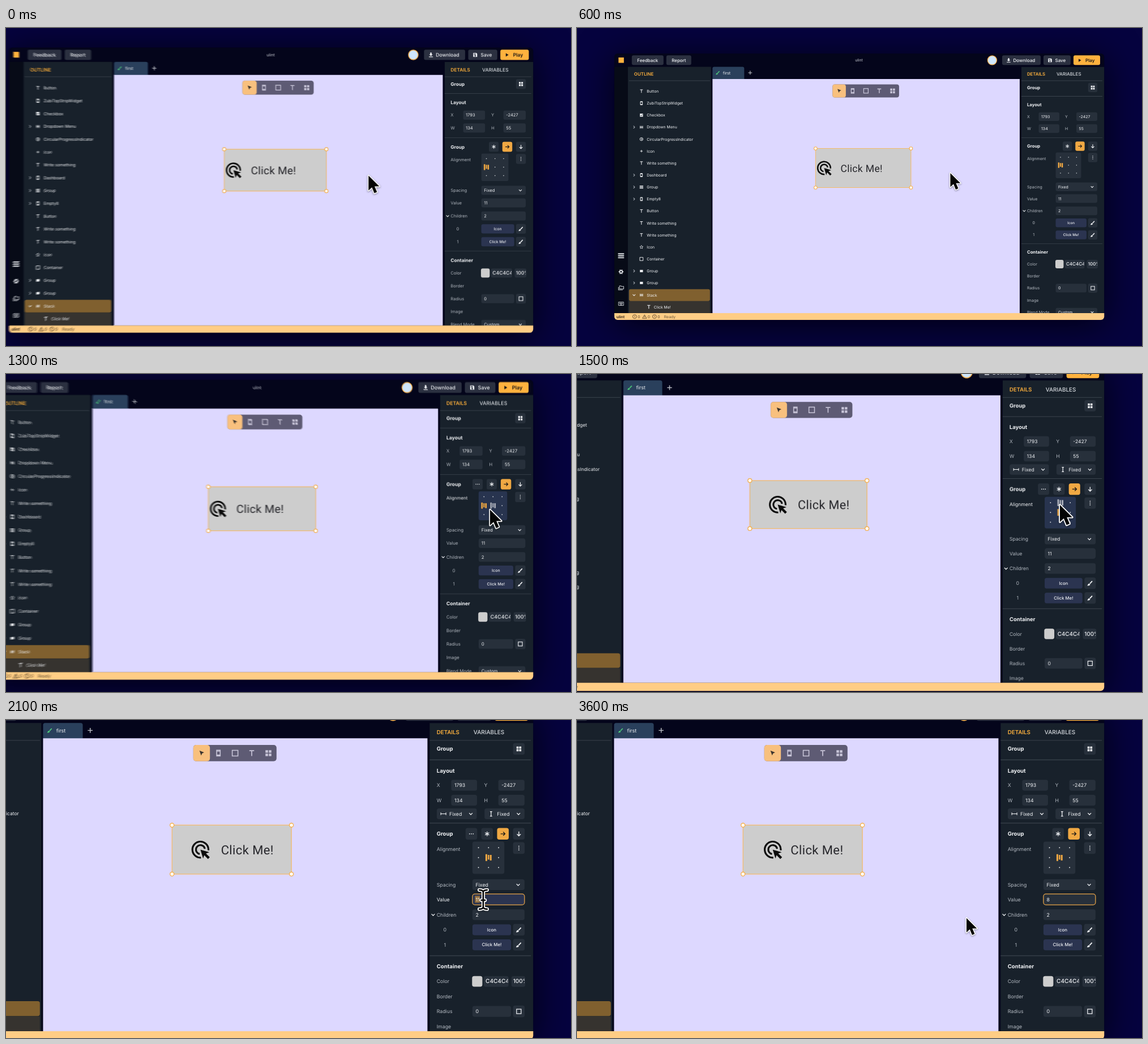
These frames come from a looping animation (998 by 561 pixels, 3.7 s). An HTML page with a canvas:

```html
<!DOCTYPE html>
<html lang="en">
<head>
<meta charset="utf-8">
<title>Editor zoom</title>
<style>
html, body { margin: 0; width: 100%; height: 100%; overflow: hidden; background: #06033f; }
canvas { display: block; width: 998px; height: 561px; }
</style>
</head>
<body>
<canvas id="stage"></canvas>
<script>
const W = 998, H = 561, LOOP = 3700, STEP = 100;
const dpr = window.devicePixelRatio || 1;
const makeCanvas = c => { c.width = W * dpr; c.height = H * dpr; return c; };
const stage = makeCanvas(document.getElementById('stage'));
const layer = makeCanvas(document.createElement('canvas'));
const out = stage.getContext('2d');
const g = layer.getContext('2d');

const ORANGE = '#ffb23e', PANEL = '#18212b', FIELD = '#27303b', CHIP = '#2b3450';
const WHITE = '#f2f4f7', GREY = '#b4bac2', LINE = '#3a434d', DARK = '#1d1a18';

// name: [path around 0,0, line width (0 = filled)]
const ICONS = {
  text: ['M-2.7-2.8H2.7M0-2.8V3.2', 1.1],
  phone: ['M-2-3.3H2V3.3H-2ZM-2-2.2H2M-2 2.2H2', 1],
  solid: ['M-3-3H3V3H-3Z', 0],
  tick: ['M-1.7 0L-.4 1.3 1.9-1.3', .9],
  menu: ['M-3-2.3H3M-3 0H3M-3 2.3H3', 1.4],
  cols: ['M-2.4-2.6V2.8M0-2.6V2.8M2.4-2.6V2.8M-3 .1H3', 1],
  ring: ['M3 0A3 3 0 1 1-3 0A3 3 0 1 1 3 0M0-1.6V1.6M1-1V1', 1],
  plus: ['M-2.4 0H2.4M0-2.4V2.4', 1],
  bigPlus: ['M-3.4 0H3.4M0-3.4V3.4', 1.1],
  card: ['M-3-2.2H3V2.2H-3Z', 0],
  star: ['M0-3.2L1-1 3.2-.8 1.5.7 2 3 0 1.8-2 3-1.5.7-3.2-.8-1-1Z', .8],
  square: ['M-3.2-3.2H3.2V3.2H-3.2Z', 1],
  right: ['M-1.1-2.2L1.1 0-1.1 2.2', 1],
  down: ['M-2.3-1.1L0 1.2 2.3-1.1', 1],
  gear: ['M2.4 0A2.4 2.4 0 1 1-2.4 0A2.4 2.4 0 1 1 2.4 0M-4.2 0H-3M3 0H4.2M-2.1-3.6L-1.5-2.6M2.1 3.6L1.5 2.6M2.1-3.6L1.5-2.6M-2.1 3.6L-1.5 2.6', 1.9],
  folder: ['M-2.7-3.2H0L1-2.2H4.6V2H-2.7ZM-4.5-1.2V3.8H3', 1],
  keys: ['M-4.5-3H4.5V3H-4.5ZM-3-1.2H3M-3 .3H3M-1.6 1.8H1.6', .9],
  widgets: ['M-3.3-3.3H-.4V-.4H-3.3ZM.5-3.3H3.4V-.4H.5ZM-3.3.5H-.4V3.4H-3.3ZM.5.5H3.4V3.4H.5Z', 0],
  goRight: ['M-3.2 0H3M.4-2.6L3 0 .4 2.6', 1.1],
  goDown: ['M0-3.2V3M-2.6.4L0 3 2.6.4', 1.1],
  burst: ['M0-3.3V3.3M-2.9-1.65L2.9 1.65M-2.9 1.65L2.9-1.65', 1],
  brush: ['M3-3L-.4.6M-1 1Q-2.2 1-2.9 2.8-1 2.8-.4 1.4', 1.5],
  dots: ['M-2.6 0h.01M0 0h.01M2.6 0h.01', 1.4],
  kebab: ['M0-2.6v.01M0 0v.01M0 2.6v.01', 1.4],
  download: ['M-1.2-3.6H1.2V-.6H3L0 2.1-3-.6H-1.2ZM-3.3 2.9H3.3V4H-3.3Z', 0],
  save: ['M-3.2-3.2H2L3.3-2V3.3H-3.2ZM-2-2V-.6H1V-2ZM1.3 1.5A1.3 1.3 0 1 0-1.3 1.5A1.3 1.3 0 1 0 1.3 1.5', 0],
  play: ['M-2-2.8L2.6 0-2 2.8Z', 0],
  pointer: ['M-2.5-2.9L3-.8.6.4-.5 2.8Z', 0],
  fixW: ['M-3.4 0H3.4M-3.6-1.8V1.8M3.6-1.8V1.8', .9],
  fixH: ['M-1.5-3.2H1.5M0-3.2V3.2M-1.5 3.2H1.5', 1],
  alert: ['M3.4 0A3.4 3.4 0 1 1-3.4 0A3.4 3.4 0 1 1 3.4 0M0-1.8V.5M0 1.4V2', .9],
  warn: ['M0-3.2L3.7 3.1H-3.7ZM0-1V1M0 1.6V2.2', .9],
  bars: ['M-4.3-4.8H-1.9V4.8H-4.3ZM-1-3.8H1V2.8H-1ZM1.9-3.8H4.3V4H1.9Z', 0],
};
for (const k in ICONS) ICONS[k][0] = new Path2D(ICONS[k][0]);

function icon(name, x, y, color = WHITE, size = 1) {
  const [path, width] = ICONS[name];
  g.save();
  g.translate(x, y);
  g.scale(size, size);
  g.lineCap = width === 1.4 ? 'round' : 'butt';
  g.lineWidth = width;
  g.fillStyle = g.strokeStyle = color;
  if (width) g.stroke(path); else g.fill(path, 'evenodd');
  g.restore();
}

function box(x, y, w, h, r, fill, stroke) {
  g.beginPath();
  g.roundRect(x, y, w, h, r);
  if (fill) { g.fillStyle = fill; g.fill(); }
  if (stroke) { g.strokeStyle = stroke; g.lineWidth = 1; g.stroke(); }
}

function disc(x, y, r, fill, stroke, width) {
  g.beginPath();
  g.arc(x, y, r, 0, 7);
  g.fillStyle = fill;
  g.fill();
  if (stroke) { g.strokeStyle = stroke; g.lineWidth = width; g.stroke(); }
}

// y is the middle of the capitals
function text(s, x, y, size = 6.8, color = WHITE, weight = 400, align = 'left') {
  g.font = `${weight} ${size}px Inter, sans-serif`;
  g.textAlign = align;
  g.fillStyle = color;
  g.fillText(s, x, y + size * .36);
}

const rule = y => box(785, y - .4, 143, .9, 0, LINE);
const tool = (name, x, y, fill = FIELD, color = WHITE) => {
  box(x - 8.2, y - 8.2, 16.4, 16.4, 3, fill);
  icon(name, x, y, color);
};
const field = (s, x, y, w) => { box(x, y - 7.6, w, 15.2, 3, FIELD); text(s, x + 4.5, y, 7); };
const label = (s, y, lit) => text(s, 795, y, 7, lit ? WHITE : GREY);

const mix = (a, b, p) => a + (b - a) * p;
const ease = (t, from, to) => {
  const p = Math.min(1, Math.max(0, (t - from) / (to - from)));
  return p * p * (3 - 2 * p);
};

function camera(t) {
  if (t < 700) return { scale: 1 + .0705 * Math.exp(-t / 104.5), cy: 193 };
  const u = Math.max(0, t - 1190) / 150;
  return { scale: 1 + .2516 * (1 - Math.exp(-(u ** 1.184))), cy: 320 };
}

function cursorAt(t) {
  const reach = ease(t, 620, 1230), drift = ease(t, 1250, 1500);
  const drop = ease(t, 1600, 2060), leave = ease(t, 3220, 3620);
  let x = mix(658.5, 862, reach), y = mix(254.5, 247, reach);
  x = mix(mix(x, 866.5, drift), 860.7, drop);
  y = mix(mix(y, 246, drift), 317.4, drop);
  x = mix(x, 735.2, leave);
  y = mix(y, 342.2, leave) + 12 * Math.sin(Math.PI * leave);
  return { x, y, size: mix(1, .82, leave) };
}

function stateAt(t) {
  const cursor = cursorAt(t), centred = t >= 1400, shift = centred ? 16.3 : 0;
  const y = cursor.y - shift, inPanel = cursor.x > 785;
  return {
    cursor, centred, shift,
    inGroup: inPanel && y > 193 && y < 380,
    onGrid: inPanel && y > 219 && y < 266,
    onValue: inPanel && y > 292 && y < 310,
    focused: t >= 2000,
    value: t >= 2700 ? 8 : 11,
  };
}

const ROWS = [
  ['text', 'Button'], ['phone', 'ZubiTopStripWidget'], ['solid', 'Checkbox'],
  ['cols', 'Dropdown Menu', 1], ['ring', 'CircularProgressIndicator'], ['plus', 'Icon'],
  ['text', 'Write something'], ['phone', 'Dashboard', 1], ['menu', 'Group', 1],
  ['phone', 'Empty8', 1], ['text', 'Button'], ['text', 'Write something'],
  ['text', 'Write something'], ['star', 'Icon'], ['square', 'Container'],
  ['card', 'Group', 1], ['card', 'Group', 1],
];

function drawHeader() {
  box(73.5, 52, 9.5, 9.5, 0, ORANGE);
  box(97, 48.4, 56, 17, 3, '#2b3040');
  text('Feedback', 125, 57, 7.9, WHITE, 500, 'center');
  box(158, 48.4, 44, 17, 3, '#2b3040');
  text('Report', 180, 57, 7.9, WHITE, 500, 'center');
  text('ulint', 498, 57, 6.8, '#c9ccd4', 400, 'center');
  disc(733.4, 57, 8, '#cfe6fb', '#f5ae4a', 1.3);
  box(751, 48.4, 68, 17, 3, '#2b3040');
  icon('download', 762.5, 56.8);
  text('Download', 770.5, 57, 8.1, WHITE, 500);
  box(824, 48.4, 48, 17, 3, '#2b3040');
  icon('save', 835.5, 57);
  text('Save', 844.5, 57, 8, WHITE, 500);
  box(877, 48.4, 47, 17, 3, ORANGE);
  icon('play', 888, 57, DARK);
  text('Play', 898, 57, 8, DARK, 600);
}

function drawOutline() {
  box(66, 68.5, 24, 434.5, 0, '#070b17');
  ['menu', 'gear', 'folder', 'keys'].forEach((n, i) =>
    icon(n, 78, 401.8 + i * 28.2, '#d0d3d8', i ? 1 : 1.5));
  box(90, 68.5, 147, 434.5, 0, PANEL);
  text('OUTLINE', 101, 81.5, 7.9, ORANGE, 600);
  box(92, 92.6, 143, .9, 0, LINE);
  ROWS.forEach(([name, title, open], i) => {
    const y = 111.5 + i * 21.14;
    if (open) icon('right', 101, y, GREY);
    icon(name, 114, y, WHITE, .9);
    if (name === 'solid') icon('tick', 114, y, PANEL);
    text(title, 123.5, y);
  });
  box(92, 482, 143, 21, 0, '#36332f');
  box(92, 460.6, 143, 21, 3, '#80602f');
  icon('down', 101, 471);
  icon('cols', 114, 471, WHITE, .9);
  text('Stack', 123.5, 471);
  icon('text', 127, 492);
  text('Click Me!', 136, 492);
}

function drawWidget(s) {
  const unit = 168.5 / 134, left = 421.5, size = 24 * unit, gap = s.value * unit;
  box(left, 212.5, 168.5, 69, 0, '#cdcdcd', '#f5bb68');
  const x = left + (s.centred ? (168.5 - size - gap - 74.5) / 2 : 0);
  g.save();
  g.translate(x, 247 - size / 2);
  g.scale(unit, unit);
  g.strokeStyle = g.fillStyle = '#0c0c0c';
  g.lineWidth = 2;
  for (const [r, a, b] of [[9, 1.5, .08], [5, 1.74, -.18]]) {
    g.beginPath();
    g.arc(12, 12, r, a, b);
    g.stroke();
  }
  g.fill(new Path2D('M12 12L22 15 18.2 16.3 22.5 20.5 20.5 22.5 16.3 18.2 15 22Z'));
  g.restore();
  g.font = '400 17.6px Roboto, sans-serif';
  g.letterSpacing = '0.31px';
  g.textAlign = 'left';
  g.fillStyle = '#26262b';
  g.fillText('Click Me!', x + size + gap, 253.6);
  g.letterSpacing = '0px';
  for (const hx of [421.5, 590]) for (const hy of [212.5, 281.5]) disc(hx, hy, 2.8, '#fff', '#f5b04e', 1.1);
}

function drawCanvasArea(s) {
  box(239.5, 68.5, 56, 22, [3, 3, 0, 0], '#2a405c');
  icon('brush', 249, 79, '#4fd07c', .9);
  text('first', 258, 79, 7.2);
  icon('bigPlus', 306, 79, '#c4c7ce');
  box(239.5, 90, 542.5, 413, 0, '#ddd8ff');
  box(451.5, 99.5, 117.5, 23, 4, '#5e5b74');
  box(451.5, 99.5, 23.5, 23, 4, '#f8c07e');
  icon('pointer', 463.2, 111, '#3b342e', 1.2);
  ['phone', 'square', 'text', 'widgets'].forEach((n, i) =>
    icon(n, 487 + i * 23.5, 111, '#c8c5d8', 1.25));
  drawWidget(s);
}

function drawAlignment(s) {
  label('Alignment', 230, s.onGrid);
  box(845.5, 219.5, 45, 45.5, 3, s.onGrid ? '#28344f' : FIELD);
  const px = s.cursor.x, py = s.cursor.y - s.shift;
  const over = s.onGrid && px > 845 && px < 891;
  const hotX = over ? Math.round((px - 854) / 14.2) : -1;
  const hotY = over ? Math.round((py - 228) / 14) : -1;
  const chosen = s.centred ? 1 : 0;
  for (let r = 0; r < 3; r++) for (let c = 0; c < 3; c++) {
    const x = 854 + c * 14.2, y = 228 + r * 14;
    if (c === chosen && r === 1) icon('bars', x, y, '#f0a843');
    else if (c === hotX && r === hotY) icon('bars', x, y, '#a9adb8');
    else disc(x, y, .75, '#e4e7ea');
  }
  tool('kebab', 911, 228.5);
}

function drawValue(s) {
  label('Value', 301, s.onValue);
  box(845.5, 293.3, 73.5, 15.2, 3.5, s.focused && s.onValue ? CHIP : FIELD, s.focused && '#e9a548');
  if (s.focused && s.value === 11) box(849, 296, 7, 9.5, 0, '#94703f');
  text(s.value, 850, 301, 7);
}

function drawDetails(s) {
  g.save();
  g.beginPath();
  g.rect(785, 68.5, 146.5, 434.5);
  g.clip();
  box(785, 68.5, 147, 435, 0, PANEL);
  text('DETAILS', 795, 81.5, 7.8, ORANGE, 600);
  text('VARIABLES', 847, 81.5, 8, '#d5d9de', 500);
  rule(93);
  text('Group', 795, 105, 7.7, WHITE, 700);
  tool('widgets', 911, 105);
  rule(120.5);
  text('Layout', 795, 135.5, 7.7, WHITE, 700);
  [['X', '1793', 'Y', '-2427'], ['W', '134', 'H', '55']].forEach(([a, va, b, vb], i) => {
    const y = 156.3 + i * 21.1;
    label(a, y);
    field(va, 815.5, y, 36.5);
    text(b, 862, y, 7, GREY);
    field(vb, 882, y, 37);
  });
  if (s.centred) {
    for (const [x, n] of [[795.2, 'fixW'], [862.5, 'fixH']]) {
      box(x, 189, 56.5, 15.2, 3, FIELD);
      icon(n, x + 9.3, 196.6);
      text('Fixed', x + 17.6, 196.6, 7);
      icon('down', x + 48, 196.6);
    }
  }
  g.translate(0, s.shift);
  rule(193.3);
  text('Group', 795, 208.5, 7.7, WHITE, 700);
  if (s.inGroup) tool('dots', 844, 208.5);
  tool('burst', 866.2, 208.5);
  tool('goRight', 888.5, 208.5, '#f0a843', DARK);
  tool('goDown', 911, 208.5);
  drawAlignment(s);
  label('Spacing', 280.2);
  field('Fixed', 845.5, 280.2, 73.5);
  icon('down', 910, 280.2);
  drawValue(s);
  icon('down', 790, 322.5);
  label('Children', 322.5);
  field('2', 845.5, 322.5, 73.5);
  ['Icon', 'Click Me!'].forEach((name, i) => {
    const y = 343.7 + i * 21.2;
    text(i, 806.7, y, 7, GREY, 400, 'center');
    box(845.5, y - 7.7, 54.5, 15.4, 3, CHIP);
    text(name, 872.7, y, 6.3, WHITE, 500, 'center');
    tool('brush', 911, y);
  });
  rule(380.3);
  text('Container', 795, 395.5, 7.7, WHITE, 700);
  label('Color', 416.5);
  box(845, 409, 14.5, 15, 3, '#cdcdcd');
  for (const [s2, x, tx, w] of [['C4C4C4', 861.5, 864, 35], ['100%', 900.5, 902.8, 19.5]]) {
    box(x, 408.9, w, 15.2, 3, FIELD);
    g.save();
    g.beginPath();
    g.rect(x, 408, w - 1, 17);
    g.clip();
    text(s2, tx, 416.2, 8, WHITE, 500);
    g.restore();
  }
  label('Border', 437.7);
  label('Radius', 458.8);
  field('0', 845.5, 458.8, 54.5);
  tool('square', 911, 458.8);
  label('Image', 480);
  label('Blend Mode', 501.2);
  field('Custom', 845.5, 501.2, 73.5);
  icon('down', 910, 501.2);
  g.restore();
}

function drawStatus() {
  box(66, 503, 866, 12, 0, '#ffcd85');
  text('ulint', 70, 509, 6.8, '#2b2115', 600);
  ['alert', 'warn', 'alert'].forEach((n, i) => {
    icon(n, 102 + i * 17.5, 509, '#5c4a2f');
    text('0', 107.5 + i * 17.5, 509, 6.8, '#5c4a2f');
  });
  text('Ready', 154, 509, 6.8, '#6d5a3b');
}

const ARROW = new Path2D('M1 1.5V26L6.6 20.8 10.6 30.4 15 28.5 11 19.2H18.8Z');
const BEAM = new Path2D('M-5.5-13.5Q-1-13.5 0-11Q1-13.5 5.5-13.5M0-11V11M-5.5 13.5Q-1 13.5 0 11Q1 13.5 5.5 13.5M-2.6 1H2.6');

function drawCursor(s) {
  const { x, y, size } = s.cursor;
  g.save();
  g.translate(x, y);
  g.lineJoin = g.lineCap = 'round';
  g.strokeStyle = '#fff';
  g.shadowColor = 'rgba(0,0,0,.4)';
  g.shadowBlur = 3 * dpr;
  g.shadowOffsetY = dpr;
  if (s.onValue && x > 845) {
    g.lineWidth = 5;
    g.stroke(BEAM);
    g.shadowColor = 'transparent';
    g.strokeStyle = '#0a0a0a';
    g.lineWidth = 2.2;
    g.stroke(BEAM);
  } else {
    g.scale(size, size);
    g.lineWidth = 3;
    g.stroke(ARROW);
    g.shadowColor = 'transparent';
    g.fillStyle = '#050505';
    g.fill(ARROW);
  }
  g.restore();
}

function drawScene(t, s) {
  const { scale, cy } = camera(t);
  g.setTransform(dpr, 0, 0, dpr, 0, 0);
  g.fillStyle = '#06033f';
  g.fillRect(0, 0, W, H);
  g.setTransform(dpr * scale, 0, 0, dpr * scale, dpr * 931.3 * (1 - scale), dpr * cy * (1 - scale));
  g.textRendering = 'geometricPrecision';
  g.save();
  g.shadowColor = 'rgba(0,0,0,.75)';
  g.shadowBlur = 64 * dpr;
  g.shadowOffsetY = 8 * dpr;
  box(66, 45, 865.3, 470, 6, '#04051b');
  g.restore();
  g.save();
  g.beginPath();
  g.roundRect(66, 45, 865.3, 470, 6);
  g.clip();
  drawHeader();
  drawOutline();
  drawCanvasArea(s);
  drawDetails(s);
  drawStatus();
  g.restore();
  drawCursor(s);
}

// Averages several moments within the shutter while the camera moves.
function render(t) {
  const state = stateAt(t), shutter = 8;
  const travel = Math.abs(camera(t + shutter / 2).scale - camera(t - shutter / 2).scale) * 931;
  const samples = travel > 1.5 ? 8 : 1;
  for (let i = 0; i < samples; i++) {
    drawScene(t + ((i + .5) / samples - .5) * shutter, state);
    out.globalAlpha = 1 / (i + 1);
    out.drawImage(layer, 0, 0);
  }
}

const start = performance.now();
let shown = -1;
function tick() {
  const t = Math.floor((performance.now() - start) % LOOP / STEP) * STEP;
  if (t !== shown) render(shown = t);
  requestAnimationFrame(tick);
}
tick();
</script>
</body>
</html>
```
